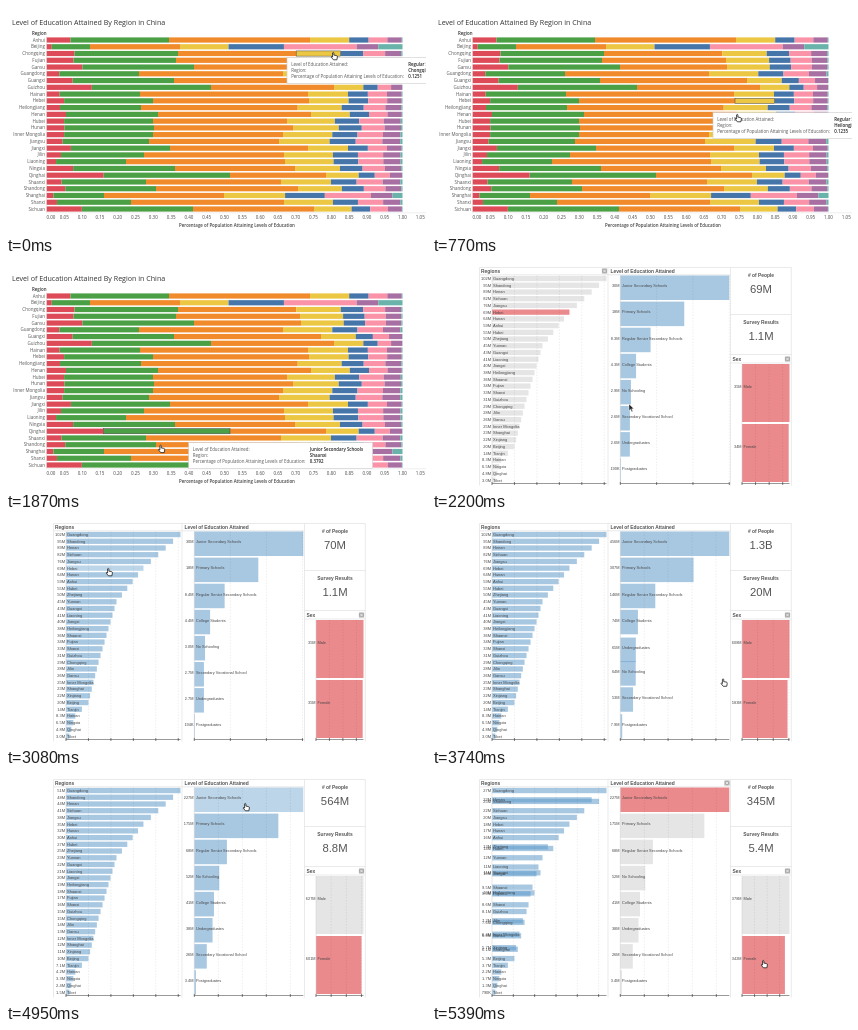
Animation, 420 px wide and 228 px high, one loop 5.5 s. Source, as an HTML page:

```html
<!DOCTYPE html>
<html lang="en">
<head>
<meta charset="utf-8">
<title>Education in China</title>
<style>
html, body { margin: 0; width: 100%; height: 100%; overflow: hidden; background: #fff; }
svg { display: block; width: 420px; height: 228px; }
.open { font-family: "Open Sans", "Noto Sans", sans-serif; }
.arial { font-family: "Liberation Sans", Arial, sans-serif; }
</style>
</head>
<body>
<svg id="stage" viewBox="0 0 420 228"></svg>
<script>
const LOOP = 5500, STEP = 110, SWITCH = 2090;
const stage = document.getElementById('stage');

const clamp = u => Math.max(0, Math.min(1, u));
const ease = u => { u = clamp(u); return u * u * (3 - 2 * u); };
const mix = (a, b, u) => a + (b - a) * u;

// Points are [time, ...values]; values move from one point to the next.
function track(t, pts, easing = ease) {
  let i = 0;
  while (i < pts.length - 2 && t >= pts[i + 1][0]) i++;
  const [a, b] = [pts[i], pts[i + 1]];
  const u = easing((t - a[0]) / (b[0] - a[0]));
  return a.slice(1).map((v, k) => mix(v, b[k + 1], u));
}

// Place of each value when sorted from large to small
const ranks = list => list.map(v => list.filter(w => w > v).length);

const rect = (x, y, w, h, fill, more = '') =>
  `<rect x="${x}" y="${y}" width="${Math.max(0, w)}" height="${h}" fill="${fill}" ${more}/>`;
const line = (x1, y1, x2, y2, color, w = .5, more = '') =>
  `<path d="M${x1} ${y1}L${x2} ${y2}" stroke="${color}" stroke-width="${w}" fill="none" ${more}/>`;
// y is the middle of the text line
const text = (x, y, str, size, fill = '#444', anchor = 'start', weight = 400) =>
  `<text x="${x}" y="${y + size * .35}" font-size="${size}" fill="${fill}" text-anchor="${anchor}" font-weight="${weight}">${str}</text>`;

const hand = (x, y) => `<path transform="translate(${x - 3} ${y - 4})" d="M1.6 .8q.7-.9 1.3 0v2.3l2.6.5q1 .2.9 1.3l-.5 2.9h-3.5L.3 5.2q-.1-.9.7-.7l.6.5z" fill="#fff" stroke="#111" stroke-width=".75" stroke-linejoin="round"/>`;
const arrow = (x, y) => `<path transform="translate(${x - 1} ${y - 4})" d="M0 0v6.6l1.6-1.4 1.1 2.6 1.1-.5-1.1-2.5h2.1z" fill="#222" stroke="#fff" stroke-width=".4"/>`;

/* Stacked bars */

const COLORS = ['#dd4a58', '#4ba046', '#f08a2a', '#ecc743', '#4575a9', '#fb93a8', '#a86fa3', '#69b3ab'];
const LEVELS = ['No Schooling', 'Primary Schools', 'Junior Secondary Schools', 'Regular Senior Secondary Schools',
  'Secondary Vocational School', 'College Students', 'Undergraduates', 'Postgraduates'];
const X0 = 40.5, X1 = 396.5;
const rowY = i => 34 + i * 6.76;

// Each region has the right edges of its primary and junior segments.
const ROWS = `Anhui 163 304, Beijing 84 174, Chongqing 172 290.2, Fujian 170 294, Gansu 188 295,
Guangdong 133 277, Guangxi 168 315, Guizhou 205 328, Hainan 134 302, Hebei 147 303, Heilongjiang 135 291.7,
Henan 152 305, Hubei 147 281, Hunan 148 287, Inner Mongolia 147 277, Jiangsu 143 273, Jiangxi 164 302,
Jilin 138 278, Liaoning 120 279, Ningxia 169 289, Qinghai 224 320, Shaanxi 140 275, Shandong 150 292,
Shanghai 98 218, Shanxi 125 278, Sichuan 187 308`.split(',').map(s => {
  const [, name, primary, junior] = s.trim().match(/(.+) (\S+) (\S+)/);
  return { name, edges: split(+primary, +junior) };
});

// The more people lack schooling, the longer the primary part;
// the longer the higher part, the more it leans to the top degrees.
function split(primary, junior) {
  const none = mix(X0, primary, Math.max(.12, .0019 * (primary - 60)));
  const high = (X1 - junior) / 222;
  const under = X1 - 24 * high ** 4;
  const senior = mix(junior, X1, .43 - .21 * high ** 4);
  const vocational = mix(senior, under, .37);
  const college = mix(vocational, under, .52 + .25 * high ** 2);
  return [X0, none, primary, junior, senior, vocational, college, under, X1];
}

function drawChart() {
  let s = text(6, 16.6, 'Level of Education Attained By Region in China', 7.1, '#333')
    + text(26, 27.7, 'Region', 4.4, '#333', 'start', 600);
  ROWS.forEach(({ name, edges }, i) => {
    const y = rowY(i);
    s += text(39, y, name, 4.5, '#555', 'end');
    COLORS.forEach((c, k) => { s += rect(edges[k], y - 2.6, edges[k + 1] - edges[k], 5.2, c); });
  });
  s += line(X0, 206.8, 420, 206.8, '#ddd') + line(X0, 30.5, X0, 206.8, '#ddd');
  for (let i = 0; i <= 21; i++) {
    s += text(i ? X0 + i * 17.8 : 45, 211.3, (i / 20).toFixed(2), 4.5, '#444', 'middle');
  }
  return s + text(231, 219, 'Percentage of Population Attaining Levels of Education', 4.4, '#444', 'middle', 600);
}
const chart = drawChart();

const pointer = t => track(Math.max(0, t), [
  [0, 328, 50], [220, 328, 50], [550, 318, 96.5], [660, 308, 105], [770, 306, 112],
  [1100, 222, 147], [1320, 222, 147], [1980, 150, 190]]);

function pick([x, y]) {
  const i = Math.round((y - 36) / 6.76);
  const { name, edges } = ROWS[i];
  const k = edges.findIndex(e => e > x) - 1;
  return { i, k, name, a: edges[k], b: edges[k + 1] };
}

// The outline and the tooltip trail behind the pointer.
function drawBars(t) {
  const late = pointer(t - STEP);
  const lit = pick(pointer(t - 2 * STEP)), hit = pick(late);
  const left = Math.min(late[0] + 14, 281), top = late[1] + 1.6;
  const rows = [['Level of Education Attained:', LEVELS[hit.k]], ['Region:', hit.name],
    ['Percentage of Population Attaining Levels of Education:', ((hit.b - hit.a) / (X1 - X0)).toFixed(4)]];
  let s = chart + rect(lit.a, rowY(lit.i) - 2.6, lit.b - lit.a, 5.2, 'none', 'stroke="#444" stroke-width=".5"');
  s += rect(left, top, 184, 26, '#fff', 'stroke="#ccc" stroke-width=".6"');
  rows.forEach(([label, value], n) => {
    const y = top + 7.2 + n * 6;
    s += text(left + 4.2, y, label, 4.4, '#555') + text(left + 121.2, y, value, 4.4, '#222', 'start', 600);
  });
  return `<g class="open">${s}</g>` + hand(...pointer(t));
}

/* Linked dashboard */

const BLUE = 'rgb(97,155,202)', RED = '#eb8a8d', GRAY = '#e5e5e5';
const FREE = 3070, FEMALE = 4130, JUNIOR = 5050;   // times of the three clicks
const HEBEI = 5;
const REGIONS = ('Guangdong,Shandong,Henan,Sichuan,Jiangsu,Hebei,Hunan,Anhui,Hubei,Zhejiang,Yunnan,Guangxi,Liaoning,'
  + 'Jiangxi,Heilongjiang,Shaanxi,Fujian,Shanxi,Guizhou,Chongqing,Jilin,Gansu,Inner Mongolia,Shanghai,Xinjiang,'
  + 'Beijing,Tianjin,Hainan,Ningxia,Qinghai,Tibet').split(',');
const SIZES = REGIONS.map((_, i) =>
  track(i, [[0, 102], [5, 69], [10, 45], [19, 29], [25, 20], [27, 8.3], [30, 3]], u => u)[0]);
const NEW_RANKS = ranks(SIZES.map((v, i) => v * (1 - .08 * Math.sin(i * i))));

// Millions in one region, in all regions, and among women
const STAGES = [
  ['Junior Secondary Schools', 30, 470, 227], ['Primary Schools', 17.6, 316, 175],
  ['Regular Senior Secondary Schools', 8.34, 151, 68], ['College Students', 4.34, 76, 41],
  ['No Schooling', 2.94, 66.5, 52], ['Secondary Vocational School', 2.65, 55, 26],
  ['Undergraduates', 2.64, 67, 38], ['Postgraduates', .19, 8.2, 3.4]];
const STAGE_RANKS = [1, 2, 3].map(k => ranks(STAGES.map(s => s[k])));

// Blends a value through the states that follow the three clicks.
function blend(t, one, all, women, junior) {
  const v = mix(mix(one, all, ease((t - FREE) / 750)), women, ease((t - FEMALE) / 430));
  return mix(v, junior, ease((t - JUNIOR) / 586));
}

function short(m) {
  if (m >= 1000) return (m / 1000).toFixed(1) + 'B';
  if (m >= 9.95) return Math.round(m) + 'M';
  return m >= 1 ? m.toFixed(1) + 'M' : Math.round(m * 1000) + 'K';
}

const closeBox = (x, y) => rect(x - 2.6, y - 2.6, 5.2, 5.2, '#aaa', 'rx=".6"')
  + line(x - 1.3, y - 1.3, x + 1.3, y + 1.3, '#fff', .7) + line(x + 1.3, y - 1.3, x - 1.3, y + 1.3, '#fff', .7);

// Axis with faint dashed grid lines at round values
function axis(x, w, top, max) {
  const base = 10 ** Math.floor(Math.log10(max));
  const step = [.2, .5, 1, 2].map(k => k * base).find(k => max / k <= 5.5);
  let s = line(x, 221.5, x + w, 221.5, '#555', .6) + line(x, top, x, 221.5, '#ccc', .5);
  for (let v = 0; v <= max * 1.001; v += step) {
    const gx = x + v / max * w;
    s += line(gx, 220, gx, 223, '#444', .7);
    if (v) s += line(gx, top, gx, 220, '#000', .4, 'opacity=".18" stroke-dasharray="1.5 1.5"');
  }
  return s;
}

function bar(x, y, w, h, fill, hover) {
  const alpha = fill === BLUE ? (hover ? .42 : .55) : 1;
  return rect(x, y, w, h, fill, `opacity="${alpha}"`);
}

function drawRegions(t) {
  const max = blend(t, 102, 102, 51, 12);
  const chosen = t < FREE;
  let s = '', labels = '';
  REGIONS.forEach((name, i) => {
    const y = 16.5 + 6.72 * blend(t, i, i, i, NEW_RANKS[i]);
    const part = SIZES[i] / SIZES[0];
    const fill = !chosen ? BLUE : i === HEBEI ? RED : GRAY;
    s += bar(60, y - 2.6, part * 114.5, 5.3, fill, i === HEBEI && t < 3400);
    labels += text(59, y, short(part * max), 4, '#444', 'end') + text(61, y, name, 4);
  });
  return s + axis(60, 114.5, 13.5, max) + labels + (chosen ? closeBox(172.5, 9) : '');
}

function drawStages(t) {
  const level = ([one, all, women]) => blend(t, one, all, women, women);
  const values = STAGES.map(([, ...v]) => level(v));
  const chosen = t >= JUNIOR;
  let s = '', labels = '';
  STAGES.forEach(([name], i) => {
    const y = 24 + 26.1 * level(STAGE_RANKS.map(r => r[i]));
    const fill = !chosen ? BLUE : i ? GRAY : RED;
    s += bar(188.3, y - 10.5, values[i] / values[0] * 109, 24.5, fill, !i && t >= 4300);
    labels += text(187.5, y, short(values[i]), 3.9, '#444', 'end') + text(190, y, name, 3.9);
  });
  return s + axis(188.3, 109, 13.5, values[0]) + labels + (chosen ? closeBox(295, 9) : '');
}

function drawSexes(t) {
  const male = blend(t, 35, 627, 627, 225), female = blend(t, 34.4, 601, 601, 182);
  const row = (name, v, top, fill) => bar(310, top, v / male * 47.5, 58, fill)
    + text(309.6, top + 22.5, short(v), 3.9, '#444', 'end') + text(311.5, top + 22.5, name, 3.9);
  return row('Male', male, 102, t >= FEMALE ? GRAY : RED) + row('Female', female, 162, RED)
    + axis(310, 47.5, 102, male) + closeBox(355.5, 97);
}

function frameLines() {
  const c = '#d4d4d4';
  return [47.5, 176, 298.5, 359.3].map(x => line(x, 5.5, x, 223.5, c)).join('')
    + line(47.5, 5.5, 359.3, 5.5, c) + line(47.5, 12.8, 298.5, 12.8, c)
    + [52.5, 92.5, 101].map(y => line(298.5, y, 359.3, y, c)).join('');
}

function drawBoard(t) {
  const people = blend(t, 69, 1333, 564, 211);
  const head = (x, y, str, anchor) => text(x, y, str, 4.9, '#555', anchor, 700);
  const at = track(t, [[SWITCH, 198, 146], [2640, 198, 146], [3000, 103, 54], [3300, 103, 54], [3900, 332, 188],
    [FEMALE, 332, 188], [4400, 240, 33], [JUNIOR, 240, 33], [5390, 332, 190]]);
  return `<g class="arial">${frameLines()}${drawRegions(t)}${drawStages(t)}${drawSexes(t)}`
    + head(49, 9, 'Regions') + head(178.5, 9, 'Level of Education Attained') + head(300.5, 97, 'Sex')
    + head(329, 13, '# of People', 'middle') + head(329, 60, 'Survey Results', 'middle')
    + text(329, 27, short(people), 11.3, '#555', 'middle')
    + text(329, 74.5, short(people * .01553), 11.3, '#555', 'middle')
    + '</g>' + (t < 2900 ? arrow : hand)(...at);
}

const start = performance.now();
let shown = -1;

function draw() {
  const t = Math.floor((performance.now() - start) % LOOP / STEP) * STEP;
  if (t !== shown) {
    stage.innerHTML = t < SWITCH ? drawBars(t) : drawBoard(t);
    shown = t;
  }
  requestAnimationFrame(draw);
}
draw();
</script>
</body>
</html>
```
